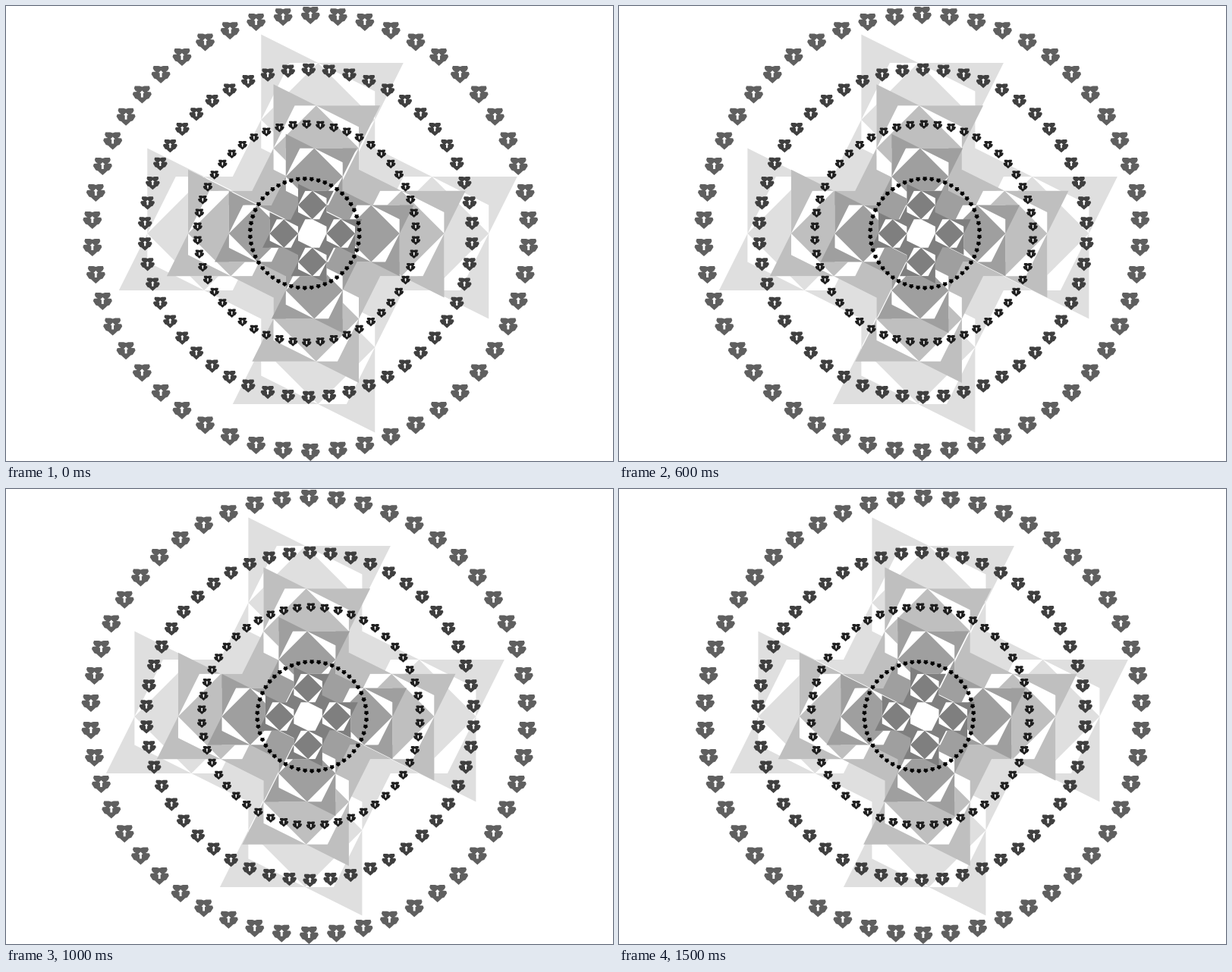
Recreate the animation shown at these times as an HTML page with a canvas. Size 800x600 px, loop 1600 ms.

```html
<!DOCTYPE html>
<html lang="en">
<head>
<meta charset="utf-8">
<title>Sliding rosette</title>
<style>
html, body { margin: 0; width: 100%; height: 100%; overflow: hidden; background: #fff; }
canvas { display: block; }
</style>
</head>
<body>
<canvas id="stage" width="800" height="600"></canvas>
<script>
const ctx = document.getElementById('stage').getContext('2d');
const STEP = 100, STEPS = 16, PETALS = 50;
const GRID = 9.375, RADIUS = 72;

const turn = (points, times) => {
  for (let i = 0; i < times; i++) points = points.map(([x, y]) => [-y, x]);
  return points;
};
const shift = (points, dx, dy) => points.map(([x, y]) => [x + dx, y + dy]);
const mirror = half => half.concat(half.map(([x, y]) => [-x, y]).reverse());

function addPolygon(path, points) {
  points.forEach(([x, y], i) => i ? path.lineTo(x, y) : path.moveTo(x, y));
  path.closePath();
}

// One pinwheel tile: a diamond with four barbs, repeated as four arms.
const diamond = [[0, -2], [2, 0], [0, 2], [-2, 0]];
const barb = [[-2, -3], [0, -2], [-1, -2], [-2, 0]];
const square = [[-2, -2], [2, -2], [2, 2], [-2, 2]];
const cross = new Path2D(), backing = new Path2D();
for (let arm = 0; arm < 4; arm++) {
  const place = points => turn(shift(points, 0, -4), arm);
  addPolygon(backing, place(square));
  addPolygon(cross, place(diamond));
  for (let i = 0; i < 4; i++) addPolygon(cross, place(turn(barb, i)));
}

// Small five-lobed flower with an arrow-shaped opening, sized for the largest ring.
const flower = new Path2D(), opening = new Path2D();
addPolygon(flower, mirror([
  [0, -10], [3, -11], [9.5, -11], [10.5, -8], [9, -5], [6.5, -3.5],
  [11.5, -3], [12.5, 0], [9, 5.5], [6, 6.5], [4, 8.5], [0, 12]
]));
addPolygon(opening, mirror([[0, -5], [3, -2], [1.4, -1.5], [1.4, 4], [0, 4]]));

function fillAt(path, color, x, y, scale) {
  ctx.setTransform(scale, 0, 0, scale, x, y);
  ctx.fillStyle = color;
  ctx.fill(path);
}

function drawCross(size, color, x) {
  fillAt(backing, '#fff', x, 300, size * GRID);
  fillAt(cross, color, x, 300, size * GRID);
}

function drawRing(size, color, x) {
  for (let i = 0; i < PETALS; i++) {
    const angle = i / PETALS * 2 * Math.PI;
    const px = x + size * RADIUS * Math.sin(angle);
    const py = 300 - size * RADIUS * Math.cos(angle);
    fillAt(flower, color, px, py, size / 4);
    if (size > 1) fillAt(opening, '#fff', px, py, size / 4);
  }
}

function draw(time) {
  const step = Math.floor(time / STEP) % STEPS;
  const spread = 2.5 * (Math.abs(step - 8) / 4 - 1);
  ctx.setTransform(1, 0, 0, 1, 0, 0);
  ctx.fillStyle = '#fff';
  ctx.fillRect(0, 0, 800, 600);
  for (let layer = 0; layer < 8; layer++) {
    const gray = Math.max(0, 223 - 32 * layer);
    const paint = layer < 4 ? drawCross : drawRing;
    paint(4 - layer % 4, `rgb(${gray},${gray},${gray})`, 400 + (4.5 - layer) * spread);
  }
}

const start = performance.now();
function tick() {
  draw(performance.now() - start);
  requestAnimationFrame(tick);
}
tick();
</script>
</body>
</html>
```
